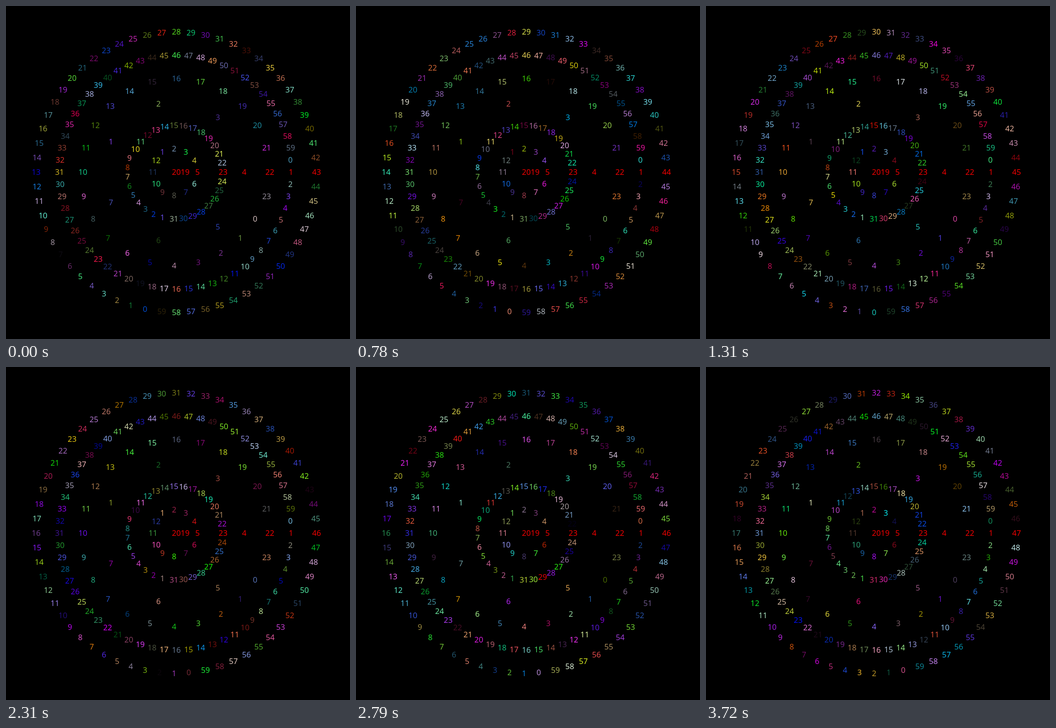
An HTML page with a canvas that plays this animation: 736x712 px, repeating every 4200 ms.

```html
<!DOCTYPE html>
<html lang="en">
<head>
<meta charset="utf-8">
<title>Ring clock</title>
<style>
  html, body { margin: 0; width: 100%; height: 100%; overflow: hidden; background: #000; }
  canvas { display: block; }
</style>
</head>
<body>
<canvas id="stage" width="736" height="712"></canvas>
<script>
const ctx = document.getElementById('stage').getContext('2d');
const LOOP = 4200;
const CENTER = 355;
const REDRAWS = [0, 310, 780, 1310, 1770, 2310, 2790, 3260, 3720];

// Rings from the inside out: how many values, the lowest one, the current one.
const RINGS = [
  { count: 12, first: 1, now: 5 },   // month
  { count: 31, first: 1, now: 23 },  // day
  { count: 7,  first: 1, now: 4 },   // weekday
  { count: 24, first: 0, now: 22 },  // hour
  { count: 60, first: 0, now: 1 },   // minute
  { count: 60, first: 0, now: 43 }   // second
];

function seededRandom(seed) {
  return () => {
    seed = (seed + 0x6D2B79F5) | 0;
    let t = Math.imul(seed ^ (seed >>> 15), 1 | seed);
    t = (t + Math.imul(t ^ (t >>> 7), 61 | t)) ^ t;
    return ((t ^ (t >>> 14)) >>> 0) / 4294967296;
  };
}

function label(text, x, y, color) {
  ctx.fillStyle = color;
  ctx.fillText(text, x, y + 6);
}

function draw(step) {
  const random = seededRandom(step * 7919 + 2019);
  const channel = () => Math.floor(random() * 256);

  ctx.fillStyle = '#000';
  ctx.fillRect(0, 0, 736, 712);
  ctx.font = '16.5px "Open Sans", "Noto Sans", sans-serif';
  label('2019', CENTER, CENTER, '#f00');

  RINGS.forEach(({ count, first, now }, ring) => {
    const radius = 50 * (ring + 1);
    // Seconds advance on every other redraw.
    const current = ring === 5 ? now + Math.ceil(step / 2) : now;
    for (let i = 0; i < count; i++) {
      const angle = i / count * 2 * Math.PI;
      const value = (current - first + i) % count + first;
      const color = i ? `rgb(${channel()},${channel()},${channel()})` : '#f00';
      label(value, CENTER + radius * Math.cos(angle), CENTER + radius * Math.sin(angle), color);
    }
  });
}

let shown = -1;
function tick() {
  const time = performance.now() % LOOP;
  const step = REDRAWS.filter(start => start <= time).length - 1;
  if (step !== shown) draw(shown = step);
  requestAnimationFrame(tick);
}
tick();
</script>
</body>
</html>
```
